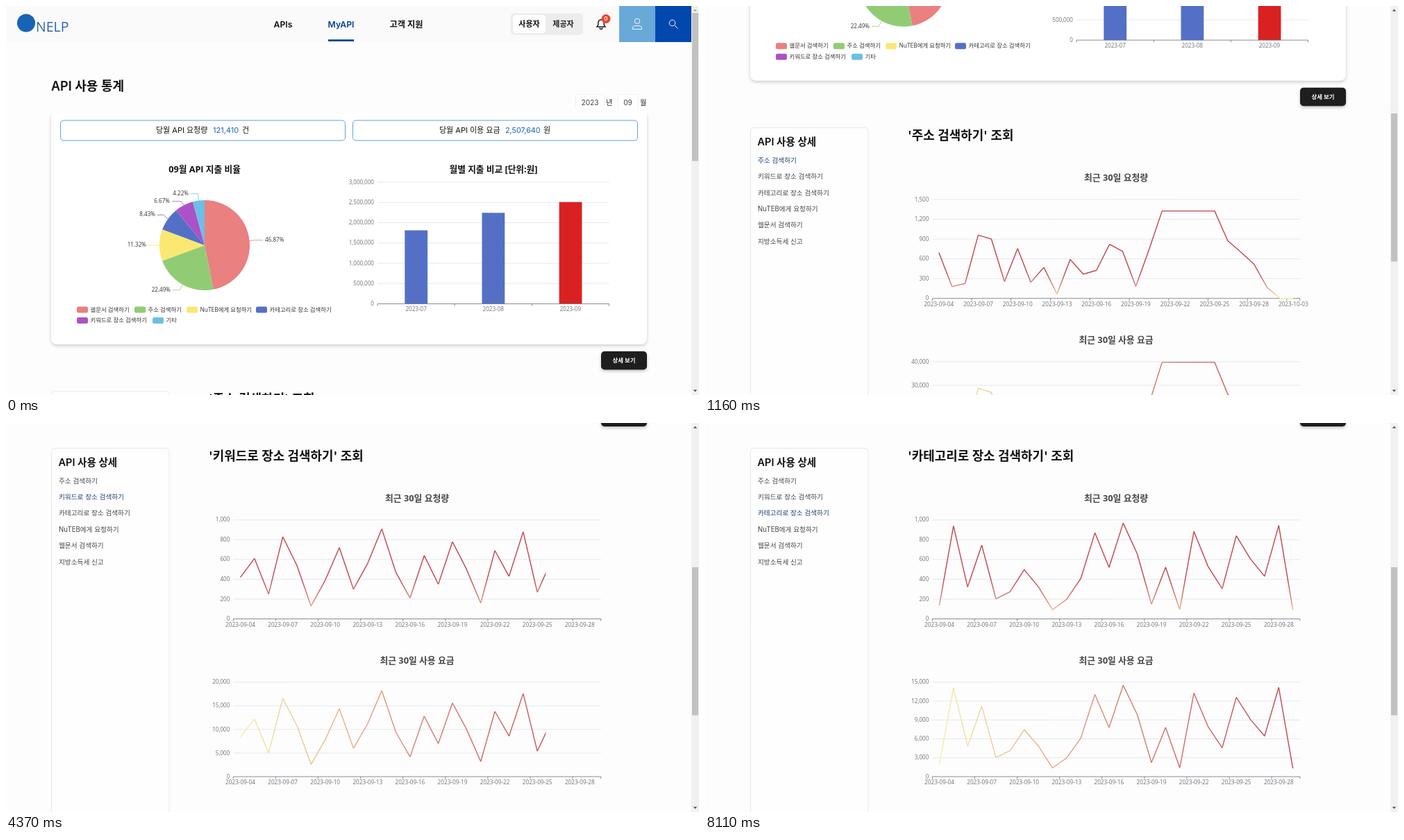
Write an HTML page with a canvas that moves like this. It is 998x561 px and loops after 8.24 s.

```html
<!DOCTYPE html>
<html lang="ko">
<head>
<meta charset="utf-8">
<title>API 사용 통계</title>
<style>
html, body { margin: 0; width: 100%; height: 100%; overflow: hidden; background: #fdfdfd; }
canvas { display: block; }
</style>
</head>
<body>
<canvas width="998" height="561"></canvas>
<script>
const ctx = document.querySelector('canvas').getContext('2d');
const UI = "Inter, 'Noto Sans CJK KR', sans-serif";
const CHART = "'Open Sans', 'Noto Sans CJK KR', sans-serif";
const LOOP = 8240, FRAME = 70, BOTTOM = 519.5;
const HEAT = ['#f6efa6', '#d88273', '#bf444c'];
const AXIS = '#6e7079', GRID = '#e0e6f1';

const APIS = ['주소 검색하기', '키워드로 장소 검색하기', '카테고리로 장소 검색하기',
  'NuTEB에게 요청하기', '웹문서 검색하기', '지방소득세 신고'];

// Request counts per day, price per request, [tick step, tick count] of both charts
const REPORTS = [
  { start: -1000, price: 30, ticks: [[300, 5], [10000, 4]],
    data: [696, 180, 225, 960, 900, 255, 757, 245, 470, 66, 590, 367, 425, 820, 712, 180, 735,
      1325, 1325, 1325, 1325, 1325, 875, 700, 520, 165, 0, 0] },
  { start: 3530, price: 20, ticks: [[200, 5], [5000, 4]],
    data: [420, 610, 250, 830, 540, 130, 390, 720, 300, 560, 910, 470, 210, 640, 350, 780, 500,
      160, 690, 430, 880, 270, 590, 740, 330, 480] },
  { start: 5134, price: 15, ticks: [[200, 5], [3000, 5]],
    data: [135, 940, 322, 745, 203, 275, 497, 325, 92, 198, 407, 870, 520, 968, 655, 148, 522,
      93, 884, 530, 305, 840, 605, 430, 945, 88] },
];

const SLICES = [ // share, colour, label x, label y
  [46.87, '#ea8080', 373, 337], [22.49, '#91cc75', 237, 409], [11.32, '#fae873', 202, 344.5],
  [8.43, '#5470c6', 215, 300.5], [6.67, '#ac52c8', 236, 281], [4.22, '#6cbfe6', 263, 270],
];
const LEGEND = [ // text, x, y
  ['웹문서 검색하기', 102, 438], ['주소 검색하기', 185, 438], ['NuTEB에게 요청하기', 260, 438],
  ['카테고리로 장소 검색하기', 360, 438], ['키워드로 장소 검색하기', 102, 453.5], ['기타', 211, 453.5],
];
const BARS = [['2023-07', 1810000], ['2023-08', 2245000], ['2023-09', 2507640]];
const SCROLL = [[190, 0], [600, 187], [880, 279], [1440, 472.5], [1650, BOTTOM]];

// y is the visual centre of the line
function text(str, x, y, size, color, weight = 400, align = 'left', font = UI) {
  ctx.font = `${weight} ${size}px ${font}`;
  ctx.textAlign = align;
  ctx.fillStyle = color;
  ctx.fillText(str, x, y + size * 0.36);
}

function box(x, y, w, h, r, fill, stroke) {
  ctx.beginPath();
  ctx.roundRect(x, y, w, h, r);
  if (fill) { ctx.fillStyle = fill; ctx.fill(); }
  if (stroke) { ctx.strokeStyle = stroke; ctx.lineWidth = 1; ctx.stroke(); }
}

function line(points, color, width = 0.8) {
  ctx.beginPath();
  points.forEach(p => ctx.lineTo(...p));
  ctx.strokeStyle = color;
  ctx.lineWidth = width;
  ctx.stroke();
}

function disc(x, y, r, fill) {
  ctx.beginPath();
  ctx.arc(x, y, r, 0, 7);
  ctx.fillStyle = fill;
  ctx.fill();
}

function icon(path, color, width) {
  ctx.strokeStyle = color;
  ctx.lineWidth = width;
  ctx.stroke(new Path2D(path));
}

function withShadow(blur, dy, alpha, draw) {
  ctx.save();
  ctx.shadowColor = `rgba(0,0,0,${alpha})`;
  ctx.shadowBlur = blur;
  ctx.shadowOffsetY = dy;
  draw();
  ctx.restore();
}

// Monotone cubic through the scroll stops
function scrollAt(t) {
  const P = SCROLL, last = P.length - 1;
  if (t <= P[0][0]) return 0;
  if (t >= P[last][0]) return BOTTOM;
  const rate = i => (P[i + 1][1] - P[i][1]) / (P[i + 1][0] - P[i][0]);
  const slope = i => i === 0 || i === last ? 0 : 2 / (1 / rate(i - 1) + 1 / rate(i));
  const i = P.findIndex((p, k) => t < P[k + 1][0]);
  const d = P[i + 1][0] - P[i][0], u = (t - P[i][0]) / d, v = 1 - u;
  return P[i][1] * v * v * (1 + 2 * u) + P[i + 1][1] * u * u * (3 - 2 * u)
    + d * u * v * (slope(i) * v - slope(i + 1) * u);
}

function header() {
  box(0, 0, 987, 52, 0, '#fafafa');
  disc(29, 24.5, 13, '#1763b4');
  text('NELP', 43, 30, 19.5, '#2a67ac', 400, 'left', "'Open Sans', sans-serif");
  text('APIs', 399, 26.5, 12.2, '#111', 600, 'center');
  text('MyAPI', 482.5, 26.5, 12.2, '#004393', 600, 'center');
  box(464, 48.3, 37, 2.7, 0, '#004393');
  text('고객 지원', 576.5, 26.5, 12.2, '#111', 600, 'center');
  box(727, 10.5, 104, 31, 5, '#ececec');
  box(730, 13, 47, 26, 4, '#fff');
  text('사용자', 753.5, 26, 11, '#111', 600, 'center');
  text('제공자', 802.5, 26, 11, '#222', 600, 'center');
  icon('M851 30H863L861.2 27V24a4.2 4.2 0 0 0-8.4 0v3zM855 31.5a2 1.8 0 0 0 4 0', '#111', 1.4);
  disc(864, 18.5, 6.5, '#f0432c');
  text('0', 864, 18.5, 8, '#fff', 600, 'center');
  box(883, 0, 52, 52, 0, '#69a9d8');
  box(935, 0, 52, 52, 0, '#0048ad');
  icon('M912.8 21.8a3.7 3.7 0 1 0-7.4 0a3.7 3.7 0 1 0 7.4 0M902.5 33.5v-1.5a3.5 3.5 0 0 1 3.5-3.5h6a3.5 3.5 0 0 1 3.5 3.5v1.5z', '#fff', 0.9);
  icon('M963.8 24.5a4.3 4.3 0 1 0-8.6 0a4.3 4.3 0 1 0 8.6 0M962.8 27.8l4.4 4.4', '#fff', 1);
}

function pie() {
  const cx = 286, cy = 345, r = 65;
  let angle = -Math.PI / 2;
  for (const [share, color, lx, ly] of SLICES) {
    const sweep = share / 100 * Math.PI * 2, mid = angle + sweep / 2;
    const at = d => [cx + d * Math.cos(mid), cy + d * Math.sin(mid)];
    const side = lx > cx ? 1 : -1;
    ctx.beginPath();
    ctx.moveTo(cx, cy);
    ctx.arc(cx, cy, r, angle, angle + sweep);
    ctx.fillStyle = color;
    ctx.fill();
    line([at(r), [at(r + 8)[0], ly + 0.7], [lx - side * 3, ly + 0.7]], color);
    text(share + '%', lx, ly, 8.1, '#333', 400, side > 0 ? 'left' : 'right', CHART);
    angle += sweep;
  }
  LEGEND.forEach(([name, x, y], i) => {
    box(x, y - 4.5, 16, 9, 2.5, SLICES[i][1]);
    text(name, x + 19.5, y - 0.5, 8.4, '#333', 400, 'left', CHART);
  });
}

// Horizontal grid with value labels; returns value → y
function yAxis(x0, x1, top, bottom, step, count) {
  const y = v => bottom - v / (step * count) * (bottom - top);
  for (let i = 0; i <= count; i++) {
    const v = i * step;
    if (i) line([[x0, y(v)], [x1, y(v)]], GRID, 0.9);
    text(v.toLocaleString('en-US'), x0 - 5, y(v) - 0.3, 8.1, AXIS, 400, 'right', CHART);
  }
  return y;
}

function xAxis(x0, x1, y, ticks) {
  line([[x0, y], [x1, y]], AXIS);
  ticks.forEach(x => line([[x, y], [x, y + 3.2]], AXIS));
}

function barChart() {
  const x0 = 535, x1 = 868.5, bottom = 429.5, w = (x1 - x0) / 3;
  const y = yAxis(x0, x1, 254, bottom, 500000, 6);
  BARS.forEach(([month, value], i) => {
    const mid = x0 + w * (i + 0.5);
    box(mid - 16.3, y(value), 32.8, bottom - y(value), 0, i < 2 ? '#5470c6' : '#d92121');
    text(month, mid, 437.5, 8.1, AXIS, 400, 'center', CHART);
  });
  xAxis(x0, x1, bottom, [0, 1, 2, 3].map(i => x0 + w * i));
}

function lineChart(title, top, bottom, data, [step, count], shown, heatByValue) {
  const x0 = 327.3, x1 = 856.8, w = (x1 - x0) / data.length;
  const x = i => x0 + w * (i + 0.5);
  text(title, 592, top - 31.5, 12.8, '#464646', 700, 'center', CHART);
  const y = yAxis(x0, x1, top, bottom, step, count);
  const ticks = [x1];
  for (let i = 0; i < data.length; i += 3) {
    const day = i < 27 ? '09-' + String(4 + i).padStart(2, '0') : '10-03';
    ticks.push(x0 + w * i);
    text('2023-' + day, x(i), bottom + 8.3, 8.2, AXIS, 400, 'center', CHART);
  }
  xAxis(x0, x1, bottom, ticks);

  const heat = heatByValue
    ? ctx.createLinearGradient(0, bottom, 0, y(400))
    : ctx.createLinearGradient(x(0), 0, x(data.length - 1), 0);
  HEAT.forEach((c, i) => heat.addColorStop(i / 2, c));
  ctx.save();
  ctx.beginPath();
  ctx.rect(x0, top - 5, (x1 - x0) * shown, bottom - top + 10);
  ctx.clip();
  ctx.lineJoin = 'bevel';
  line(data.map((v, i) => [x(i), y(v)]), heat, 1.4);
  ctx.restore();
}

function summary() {
  text('API 사용 통계', 65, 115.5, 18, '#111', 600);
  box(820.5, 127.5, 41, 24, 3, '#fff', '#f1f1f1');
  box(881.5, 127.5, 28.5, 24, 3, '#fff', '#f1f1f1');
  text('2023', 841, 139.5, 10.2, '#444', 400, 'center');
  text('년', 864, 139.5, 10.2, '#222');
  text('09', 895.5, 139.5, 10.2, '#444', 400, 'center');
  text('월', 913, 139.5, 10.2, '#222');

  withShadow(5, 2, 0.2, () => box(65, 153, 858, 335, 8, '#fff'));
  box(65, 148, 858, 60, 8, '#fdfdfd');
  box(65, 155, 858, 100, [8, 8, 0, 0], '#fff');
  box(78.5, 165, 410, 29, 4.5, '#fff', '#5ba3d0');
  box(499.5, 165, 410, 29, 4.5, '#fff', '#5ba3d0');
  text('당월 API 요청량', 216, 179.5, 11, '#111');
  text('121,410', 298, 179.5, 11, '#1763b8');
  text('건', 340, 179.5, 11, '#111');
  text('당월 API 이용 요금', 624, 179.5, 11, '#111');
  text('2,507,640', 719, 179.5, 10.8, '#1763b8');
  text('원', 774, 179.5, 11, '#111');

  text('09월 API 지출 비율', 286, 235.5, 12.7, '#111', 700, 'center', CHART);
  text('월별 지출 비교 [단위:원]', 702, 235.5, 12.7, '#111', 700, 'center', CHART);
  pie();
  barChart();
  withShadow(4, 2, 0.25, () => box(857, 498, 66, 26.5, 5, '#1e1e1e'));
  text('상세 보기', 890, 511.3, 8.4, '#fff', 700, 'center');
}

function details(t) {
  const picked = t < 2760 ? 0 : t < 4600 ? 1 : 2;
  box(65.5, 555.8, 169.5, 700, 5, '#fefefe', '#e6e8ec');
  text('API 사용 상세', 75.5, 576.5, 14.5, '#111', 600);
  APIS.forEach((name, i) =>
    text(name, 76, 602.7 + 23.4 * i, 9.65, i === picked ? '#1d4075' : '#444'));
  text(`'${APIS[picked]}' 조회`, 292, 567, 17.9, '#111', 600);

  const { start, price, ticks, data } = REPORTS.findLast(r => t >= r.start);
  const shown = Math.min(1, (t - start) / 1000);
  lineChart('최근 30일 요청량', 659.3, 802, data, ticks[0], shown, true);
  lineChart('최근 30일 사용 요금', 893.3, 1029.5, data.map(v => v * price), ticks[1], shown, false);
}

function scrollbar(top) {
  box(987, 0, 11, 561, 0, '#f1f1f1');
  box(988, 10 + top * 0.381, 9, 213.5, 0, '#c1c1c1');
  ctx.fillStyle = top ? '#505050' : '#a3a3a3';
  ctx.fill(new Path2D('M989.8 7.5h5.4l-2.7-3z'));
  ctx.fillStyle = '#505050';
  ctx.fill(new Path2D('M989.8 553.5h5.4l-2.7 3z'));
}

function draw(now) {
  // The screen refreshes in coarse steps
  const t = Math.max(0, Math.floor((now % LOOP - 30) / FRAME) * FRAME + 40);
  const top = scrollAt(t);
  box(0, 0, 998, 561, 0, '#fdfdfd');
  ctx.save();
  ctx.translate(0, -top);
  header();
  summary();
  details(t);
  ctx.restore();
  scrollbar(top);
  requestAnimationFrame(draw);
}
requestAnimationFrame(draw);
</script>
</body>
</html>
```
